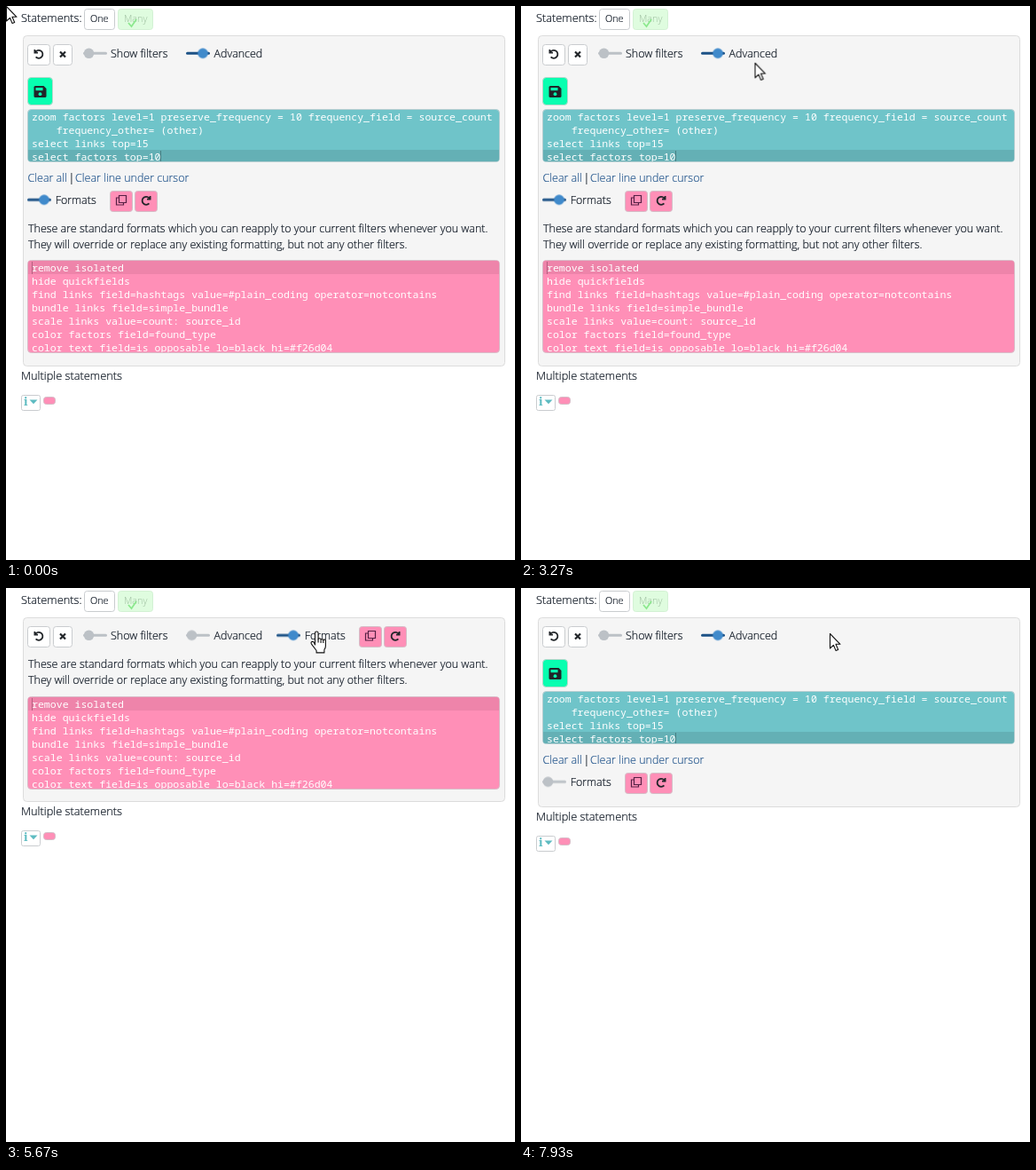
Recreate the animation shown at these times as an HTML page. Size 574x624 px, loop 8000 ms.

```html
<!DOCTYPE html>
<html lang="en">
<head>
<meta charset="utf-8">
<title>Filter panel</title>
<style>
html, body { margin: 0; width: 100%; height: 100%; overflow: hidden; background: #fff; }
svg { display: block; width: 574px; height: 624px; }
text {
  font: 300 12.48px "Open Sans", "Noto Sans", sans-serif; white-space: pre;
  fill: #0d1622; stroke: #0d1622; stroke-width: .2;
}
.big { font-size: 12.8px; }
.small { font-size: 10.8px; }
.code text { font: 400 11.55px "Noto Sans Mono", "DejaVu Sans Mono", monospace; fill: #fff; stroke: none; }
.link { fill: #2a5b90; stroke: #2a5b90; }
.pale { fill: #9cbd9e; stroke: none; }
.info { font: 700 12px "DejaVu Serif", "Noto Serif", serif; fill: #5dbbc1; stroke: none; }
.btn { fill: #fff; stroke: #c9cccf; }
.pink { fill: #ff8fb7; stroke: #d5bcc6; }
.icon { fill: none; stroke: #212529; stroke-width: 1.8; }
.track { stroke: #bcc1c6; stroke-width: 3; stroke-linecap: round; }
.knob { fill: #bcc1c6; }

/* Layout changes are instant */
.panel, .adv, .fmtRow, .note, .editor, .fmtShow, .foot, .arrow, .hand { animation: 8s step-end infinite; }
.panel { animation-name: panel; }
.adv { animation-name: adv; }
.fmtRow { animation-name: fmtRow; }
.note { animation-name: note; }
.editor { animation-name: editor; }
.fmtShow { animation-name: fmtShow; }
.foot { animation-name: foot; }
.arrow { animation-name: arrow; }
.hand { animation-name: hand; }
@keyframes panel { 0% { height: 372px } 57.5% { height: 207px } 76.625% { height: 48px } 90.875% { height: 213px } }
@keyframes adv { 0%, 90.875% { visibility: visible } 57.5% { visibility: hidden } }
@keyframes fmtRow { 0%, 90.875% { transform: none } 57.5% { transform: translate(281px, -165px) } }
@keyframes note { 0% { transform: none } 57.5% { transform: translateY(-165px) } }
@keyframes editor { 0% { transform: none } 57.5% { transform: translateY(-164px) } }
@keyframes fmtShow { 0% { visibility: visible } 76.625% { visibility: hidden } }
@keyframes foot {
  0% { transform: none } 57.5% { transform: translateY(-165px) }
  76.625% { transform: translateY(-324px) } 90.875% { transform: translateY(-159px) }
}
@keyframes hand {
  0%, 20%, 34.5%, 95% { visibility: hidden }
  17.5%, 31.625%, 48.75% { visibility: visible }
}
@keyframes arrow {
  0%, 20%, 34.5%, 95% { visibility: visible }
  17.5%, 31.625%, 48.75% { visibility: hidden }
}

/* Switches slide and fade between grey and blue */
.advSw .track { animation: advTrack 8s infinite; }
.advSw .knob { animation: advKnob 8s infinite; }
.fmtSw .track { animation: fmtTrack 8s infinite; }
.fmtSw .knob { animation: fmtKnob 8s infinite; }
@keyframes advTrack { 0%, 58%, 94.25%, 100% { stroke: #1d5286 } 61%, 91.25% { stroke: #bcc1c6 } }
@keyframes advKnob {
  0%, 58%, 94.25%, 100% { fill: #408acb; transform: translateX(12.5px) }
  61%, 91.25% { fill: #bcc1c6; transform: none }
}
@keyframes fmtTrack { 0%, 77.1% { stroke: #1d5286 } 80%, 100% { stroke: #bcc1c6 } }
@keyframes fmtKnob {
  0%, 77.1% { fill: #408acb; transform: translateX(12.5px) }
  80%, 100% { fill: #bcc1c6; transform: none }
}

.pointer { fill: #fff; stroke: #111; stroke-width: 1.1; stroke-linejoin: round; animation: move 8s linear infinite; }
@keyframes move {
  0%, 7.6% { transform: translate(0, 0) }
  12.5% { transform: translate(70px, 160px) }
  15% { transform: translate(138px, 284px) }
  18.375%, 19% { transform: translate(147px, 224px) }
  21.4% { transform: translate(86px, 135px) }
  24.2% { transform: translate(254px, 63px) }
  27.5%, 31.6% { transform: translate(172px, 60px) }
  31.625%, 33.3% { transform: translate(172px, 58px) }
  36.625%, 40.8% { transform: translate(264px, 64px) }
  42% { transform: translate(257px, 61px) }
  43.375%, 45.8% { transform: translate(262px, 61px) }
  50.875%, 63% { transform: translate(251px, 50px) }
  67.5% { transform: translate(329px, 49px) }
  70.875%, 80% { transform: translate(350px, 49px) }
  84.125%, 93.5% { transform: translate(249px, 51px) }
  99.1%, 100% { transform: translate(348px, 51px) }
}
</style>
</head>
<body>
<svg viewBox="0 0 574 624">
  <defs>
    <path id="undo" d="M-4.6-5V-1.4H-1M-4.2-1.6A4.5 4.5 0 1 1-3.4 3.4"/>
    <clipPath id="advClip"><rect x="25" y="117" width="531" height="58" rx="3"/></clipPath>
    <clipPath id="fmtClip"><rect x="25" y="287" width="531" height="103" rx="3"/></clipPath>
  </defs>

  <text class="big" x="17" y="18">Statements:</text>
  <rect class="btn" x="88.500" y="3.500" width="34" height="23" rx="3"/>
  <text class="small" x="95" y="18">One</text>
  <rect x="126.500" y="3.500" width="39" height="23" rx="3" fill="#dffcdf" stroke="#d3f1d4"/>
  <text class="small pale" x="133" y="18">Many</text>
  <path d="M138 19l3.500 4L147 15" fill="none" stroke="#8be88d" stroke-width="1.700"/>

  <rect class="panel" x="19.500" y="33.500" width="543" height="372" rx="4" fill="#f5f5f5" stroke="#dcdcdc"/>
  <rect class="btn" x="24.500" y="43.500" width="25" height="23" rx="3"/>
  <use href="#undo" class="icon" x="37" y="54"/>
  <rect class="btn" x="53.500" y="43.500" width="21" height="23" rx="3"/>
  <path class="icon" style="stroke-width:2.200" d="M61 51.500l6 6m0-6l-6 6"/>

  <g transform="translate(87 53.300)">
    <path class="track" d="M1.500 0H25.500"/><circle class="knob" cx="6.500" r="5.800"/>
  </g>
  <text x="118" y="58">Show filters</text>
  <g class="advSw" transform="translate(203 53.300)">
    <path class="track" d="M1.500 0H25.500"/><circle class="knob" cx="6.500" r="5.800"/>
  </g>
  <text x="234.500" y="58">Advanced</text>

  <g class="adv">
    <rect x="24.500" y="80.500" width="28" height="31" rx="4" fill="#08ffb0" stroke="#b9d6cb"/>
    <path d="M33 90h9.500l3 3v8.500q0 1.500-1.500 1.500H33q-1.500 0-1.500-1.500v-10q0-1.500 1.500-1.500z" fill="#212529"/>
    <path d="M33.500 92h8v3.200h-8z" fill="#08ffb0"/><circle cx="38.500" cy="99.200" r="1.900" fill="#08ffb0"/>
    <rect x="24.500" y="116.500" width="532" height="59" rx="4" fill="#6fc4c9" stroke="#b9cfd2"/>
    <g class="code" clip-path="url(#advClip)">
      <path d="M25 162h531v14H25z" fill="#64b0b5"/>
      <text x="29" y="129">zoom factors level=1 preserve_frequency = 10 frequency_field = source_count</text>
      <text x="56.700" y="144">frequency_other= (other)</text>
      <text x="29" y="159">select links top=15</text>
      <text x="29" y="174">select factors top=10</text>
      <path d="M174.500 163v13" stroke="#477e82"/>
    </g>
    <text class="link" x="24.500" y="198">Clear all</text>
    <text x="70.500" y="198">|</text>
    <text class="link" x="78" y="198">Clear line under cursor</text>
  </g>

  <g class="fmtRow">
    <g class="fmtSw" transform="translate(24 218.300)">
      <path class="track" d="M1.500 0H25.500"/><circle class="knob" cx="6.500" r="5.800"/>
    </g>
    <text x="55.700" y="223">Formats</text>
    <rect class="pink" x="117.500" y="208.500" width="25" height="23" rx="3"/>
    <path class="icon" style="stroke:#552044;stroke-width:1.200" d="M127.500 213.500h8v8h-8zM127 216h-2.500v8h8v-2"/>
    <rect class="pink" x="145.500" y="208.500" width="25" height="23" rx="3"/>
    <use href="#undo" class="icon" transform="translate(158 219) scale(-1 1)"/>
  </g>

  <g class="fmtShow">
    <g class="note">
      <text x="25" y="255">These are standard formats which you can reapply to your current filters whenever you want.</text>
      <text x="25" y="273">They will override or replace any existing formatting, but not any other filters.</text>
    </g>
    <g class="editor">
      <rect x="24.500" y="286.500" width="532" height="104" rx="4" fill="#ff8fb7" stroke="#d9bcc8"/>
      <g class="code" clip-path="url(#fmtClip)">
        <path d="M25 287h531v15H25z" fill="#ee84aa"/>
        <text x="29" y="299">remove isolated</text>
        <text x="29" y="314">hide quickfields</text>
        <text x="29" y="329">find links field=hashtags value=#plain_coding operator=notcontains</text>
        <text x="29" y="344">bundle links field=simple_bundle</text>
        <text x="29" y="359">scale links value=count: source_id</text>
        <text x="29" y="374">color factors field=found_type</text>
        <text x="29" y="389">color text field=is_opposable lo=black hi=#f26d04</text>
        <path d="M29.500 288v14" stroke="#b45f7e"/>
      </g>
    </g>
  </g>

  <g class="foot">
    <text class="big" x="17" y="421">Multiple statements</text>
    <rect class="btn" x="17.500" y="438.500" width="21" height="17" rx="2"/>
    <text class="info" x="20" y="450">i</text>
    <path d="M26.500 443.500h9l-4.500 4.800z" fill="#5dbbc1"/>
    <rect class="pink" x="42.500" y="440.500" width="13" height="8" rx="3"/>
  </g>

  <g class="pointer">
    <path class="arrow" d="M.5.5V17l3.900-3.700 2.700 6.300 2.600-1.100L7 12.300h5z"/>
    <g class="hand" transform="translate(-6.500 -.5)">
      <path d="M5 15.500V2.300a1.800 1.800 0 0 1 3.600 0V9.200a1.600 1.600 0 0 1 3 .4a1.600 1.600 0 0 1 2.700.7a1.400 1.400 0 0 1 2.600 1V17q0 2-1.500 4v3.400H6.600V22L1 14.600q-1-1.800.4-2.600 1.300-.6 2.600 1z"/>
      <path d="M8.600 9v4M11.600 10v3.500M14.300 10.500v3" fill="none"/>
    </g>
  </g>
</svg>
</body>
</html>
```
